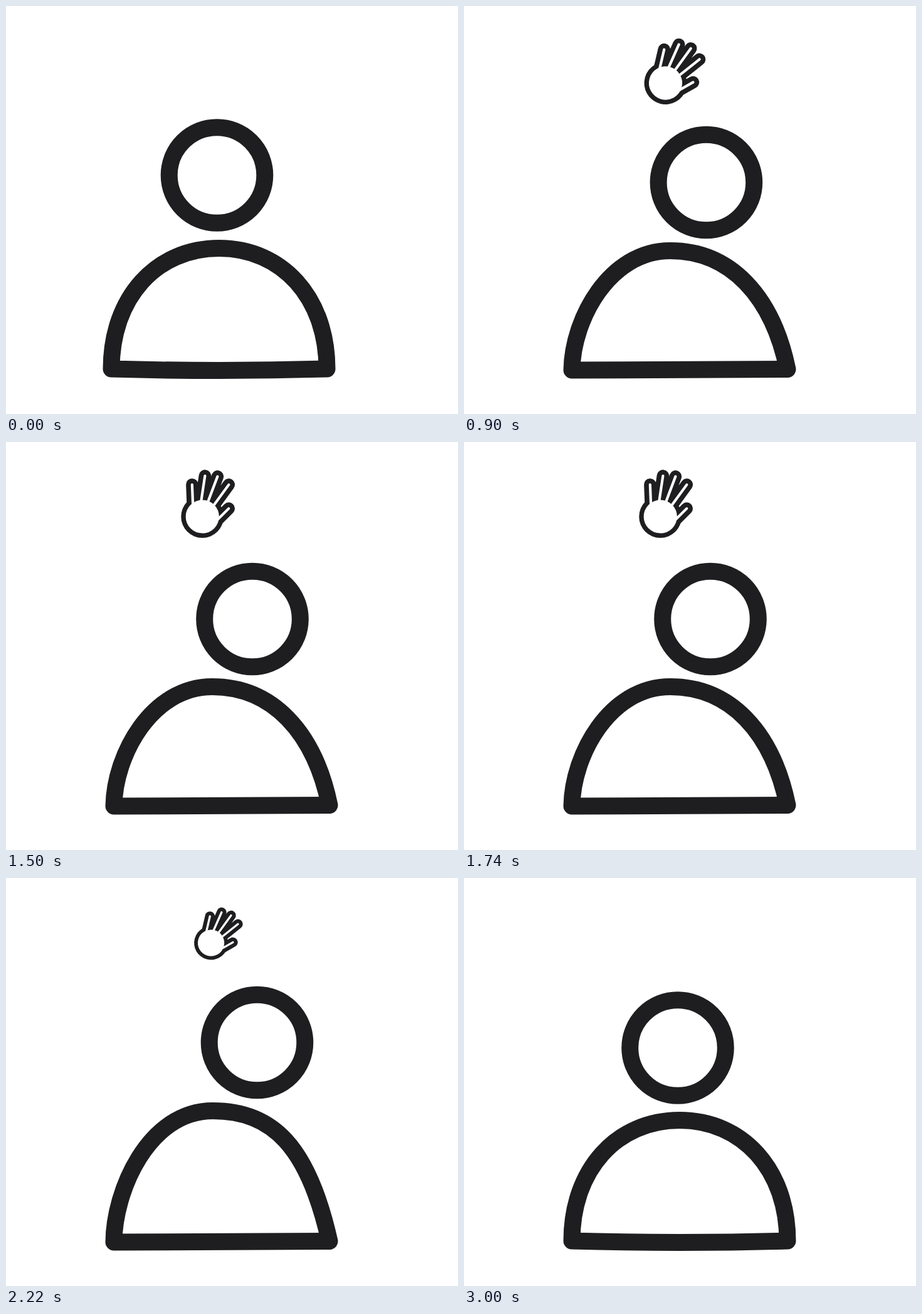
An HTML page that plays this animation: 721 px wide and 651 px high, repeating every 3.78 s.

```html
<!DOCTYPE html>
<html lang="en">
<head>
<meta charset="utf-8">
<title>Waving person</title>
<style>
  html, body { margin: 0; width: 100%; height: 100%; overflow: hidden; background: #fff; }
  svg { display: block; width: 721px; height: 651px; }
  #body, #head { fill: #fff; stroke: #1e1e20; stroke-width: 27; stroke-linejoin: round; }
  #hand { stroke: #1e1e20; stroke-width: 19.5; stroke-linecap: round; fill: #1e1e20; }
  #hand .inside { stroke: #fff; stroke-width: 4.2; fill: #fff; }
  #hand circle { stroke: none; }
</style>
</head>
<body>
<svg viewBox="0 0 721 651">
  <g id="hand">
    <path id="fingers" d="M-16.5 -51L-15 -15 M4 -65L-3 -18 M24 -64L6 -16 M42 -51L13 -11 M42 -13L12 17"/>
    <circle r="34"/>
    <use href="#fingers" class="inside"/>
    <circle r="24.5" class="inside"/>
  </g>
  <path id="body"/>
  <circle id="head" r="76.3"/>
</svg>
<script>
const LOOP = 3780, STEP = 60, LAST = 3000;
const $ = id => document.getElementById(id);

const ramp = (t, a, b) => Math.min(1, Math.max(0, (t - a) / (b - a)));
const ease = (t, a, b) => { const u = ramp(t, a, b); return u * u * (3 - 2 * u); };
const easeOut = (t, a, b) => 1 - (1 - ramp(t, a, b)) ** 3;
const bump = (t, a, b) => Math.sin(Math.PI * ramp(t, a, b));
const mix = (a, b, k) => a + (b - a) * k;
const blend = (p, q, k) => p.map(([x, y], i) => [mix(x, q[i][0], k), mix(y, q[i][1], k)]);

// Half-dome: left foot, handles around the top, right foot, handle of the base line.
const dome = (left, top, right, base) => [
  left[0], left[1], [left[2], top[1]], top, [right[0], top[1]], right[1], right[2], base];
const upright = (x, y) => dome(
  [[x - 172, 579], [x - 172, 465], x - 100], [x, y], [x + 100, [x + 172, 465], [x + 172, 579]], [x, 584]);
const leaning = dome(
  [[172, 581], [173, 500], 232], [329, 390.5], [425, [492, 463], [516, 579.5]], [344, 580.5]);
const raised = dome(
  [[172, 581], [172, 502], 226], [330, 371.5], [425, [482, 428], [516, 579.5]], [344, 580.5]);

function draw(t) {
  const settle = ease(t, 0, 540), hop = bump(t, 60, 540);
  const slide = easeOut(t, 600, 1180), lean = ease(t, 570, 840);
  const rise = ease(t, 1980, 2160), back = ease(t, 2220, 2700);

  $('head').setAttribute('cx', 336.5 - 2 * settle + 58.5 * slide + 7.5 * rise - 59.5 * back);
  $('head').setAttribute('cy', 270 + 4 * settle - 16 * hop + 8.5 * slide - 20 * rise + 8.5 * back);

  const rest = upright(340, 386.5 - 2 * settle - 4 * hop);
  rest[7][1] -= 4 * settle;
  const tall = blend(blend(rest, leaning, lean), raised, rise);
  const p = blend(tall, upright(344, 386.5), back);
  $('body').setAttribute('d', `M${p[0]}C${p.slice(1, 7).join(' ')}Q${p[7]} ${p[0]}Z`);

  // The hand swings up in an arc, waves three times, then shrinks away.
  const come = ease(t, 600, 900), gone = ramp(t, 2160, 2450);
  const arc = (a, b, c) => mix(mix(a, b, come), mix(b, c, come), come);
  const wave = (1 - Math.cos(ramp(t, 900, 1980) * 6 * Math.PI)) / 2;
  const x = arc(200, 45, 321.5) - 11 * wave + 27 * gone;
  const y = arc(440, 200, 123) - 5.3 * wave - 20 * rise + 3 * gone;
  const turn = mix(-70, 15.5, come) - 20.5 * wave;
  const size = Math.min(1, 1.6 * come) * (1 - gone);
  $('hand').setAttribute('transform', `translate(${x} ${y}) rotate(${turn}) scale(${size})`);
}

const start = performance.now();
function tick() {
  const t = (performance.now() - start) % LOOP;
  draw(Math.min(Math.floor(t / STEP) * STEP, LAST));
  requestAnimationFrame(tick);
}
tick();
</script>
</body>
</html>
```
